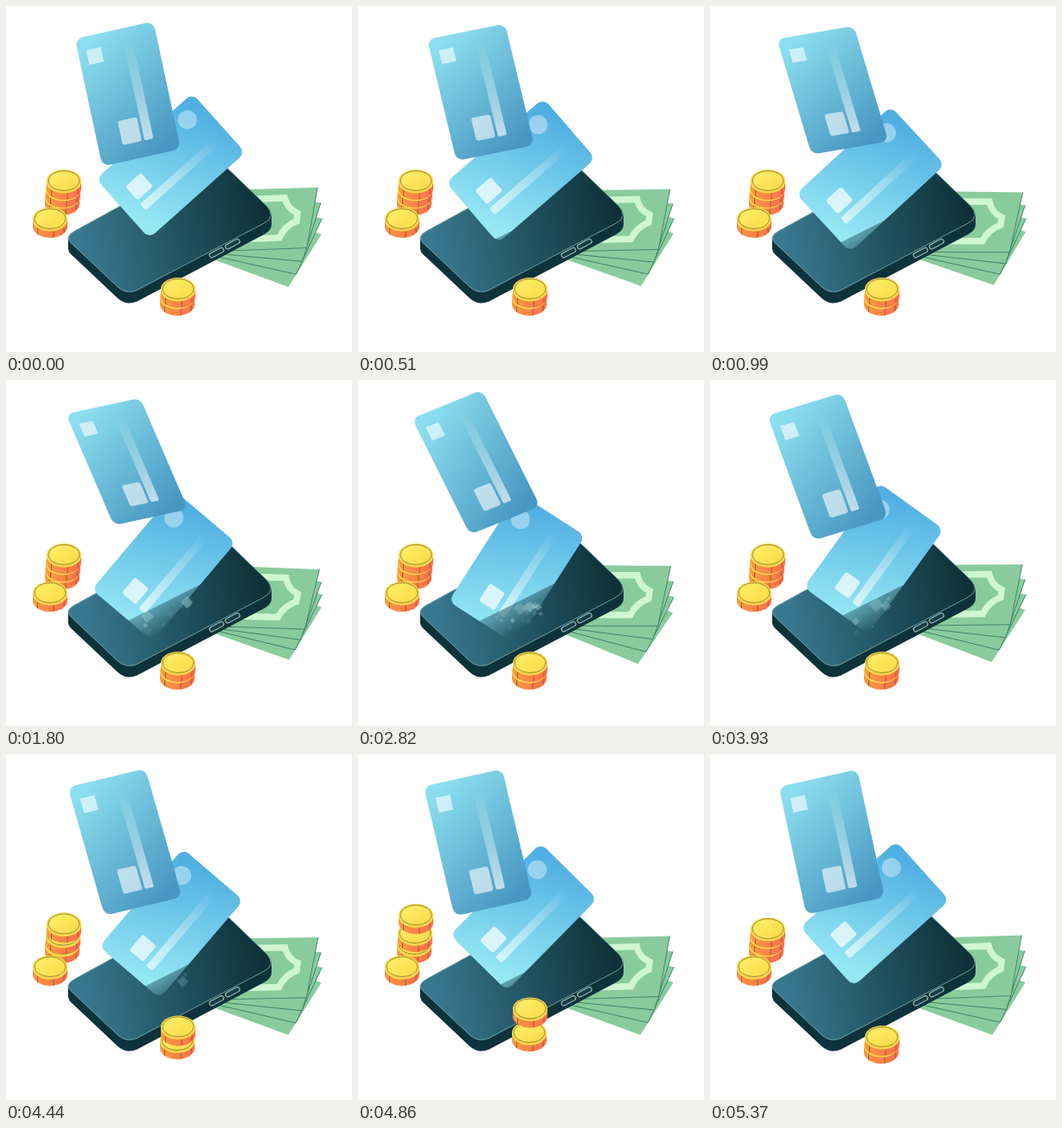
An HTML page for the animation above (5400 ms loop, 400 by 400 pixels).

```html
<!DOCTYPE html>
<html lang="en">
<head>
<meta charset="utf-8">
<title>Mobile payment</title>
<style>
  html, body { margin: 0; width: 100%; height: 100%; overflow: hidden; background: #fff; }
  svg { display: block; width: 100vw; height: 100vh; }
  #bills { color: #417f69; }
  #bills > :first-child { color: #89cb9b; }
</style>
</head>
<body>
<svg viewBox="0 0 400 400">
  <defs>
    <linearGradient id="upperFill" x1=".3" y1="0" x2=".7" y2="1">
      <stop offset="0" stop-color="#8bdeee"/><stop offset="1" stop-color="#4897c2"/>
    </linearGradient>
    <linearGradient id="lowerFill" x1="0" y1=".65" x2="1" y2=".35">
      <stop offset="0" stop-color="#96e8f3"/><stop offset="1" stop-color="#50afe2"/>
    </linearGradient>
    <linearGradient id="stripeDown" x1="0" y1="0" x2="0" y2="1">
      <stop offset="0" stop-color="#fff" stop-opacity="0"/><stop offset="1" stop-color="#fff" stop-opacity=".65"/>
    </linearGradient>
    <linearGradient id="stripeAcross">
      <stop offset="0" stop-color="#fff" stop-opacity=".65"/><stop offset="1" stop-color="#fff" stop-opacity="0"/>
    </linearGradient>
    <linearGradient id="screen" gradientUnits="userSpaceOnUse" x1="85" y1="270" x2="295" y2="225">
      <stop offset="0" stop-color="#397990"/><stop offset=".5" stop-color="#225463"/><stop offset="1" stop-color="#0e3138"/>
    </linearGradient>
    <linearGradient id="coinSide">
      <stop offset="0" stop-color="#fb9a40"/><stop offset="1" stop-color="#ff6c4c"/>
    </linearGradient>
    <linearGradient id="coinTop" x1="0" y1="0" x2="1" y2="1">
      <stop offset="0" stop-color="#fff06a"/><stop offset="1" stop-color="#fbd945"/>
    </linearGradient>
    <linearGradient id="fade" gradientUnits="userSpaceOnUse" x1="160" y1="269" x2="174" y2="297">
      <stop offset="0" stop-color="#fff" stop-opacity=".5"/><stop offset="1" stop-color="#fff" stop-opacity="0"/>
    </linearGradient>
    <mask id="fadeMask" maskUnits="userSpaceOnUse" x="0" y="0" width="400" height="400">
      <path d="M0 349L400 149V400H0Z" fill="url(#fade)"/>
    </mask>
    <clipPath id="above"><path d="M0 0H400V149L0 349Z"/></clipPath>
    <clipPath id="below"><path d="M0 349L400 149V400H0Z"/></clipPath>

    <g id="bill">
      <path d="M230 213.5L360 209L348 279L230 284Z" fill="#89cb9b"/>
      <path d="M360 209L348 279L230 284" fill="none" stroke="currentColor" stroke-width=".9"/>
    </g>
    <g id="coin">
      <path d="M-20 0V9A20 13 0 0 0 20 9V0Z" fill="url(#coinSide)"/>
      <path d="M-14.5 11V18M4 14V21.5M16 9V16" stroke="#8f5a30" stroke-width=".9"/>
      <ellipse cy="1.6" rx="20" ry="13" fill="#ffd94a"/>
      <ellipse rx="20" ry="13" fill="#ffd548"/>
      <ellipse rx="18" ry="11.5" fill="url(#coinTop)" stroke="#8d8436" stroke-width=".9"/>
    </g>
    <g id="lower">
      <rect x="-74.5" y="-46" width="149" height="92" rx="9" fill="url(#lowerFill)"/>
      <rect x="-55" y="-17" width="24" height="21" rx="3" fill="#fff" opacity=".7"/>
      <rect x="-56" y="9.5" width="114" height="9.5" rx="2" fill="url(#stripeAcross)"/>
      <circle cx="50" cy="-27" r="11" fill="#fff" opacity=".38"/>
    </g>
  </defs>

  <g id="bills">
    <use href="#bill"/><use href="#bill"/><use href="#bill"/>
    <g>
      <use href="#bill"/>
      <path d="M262 224L322 221.5Q325 234 337 239L336 248Q322 254 316 267.5L262 270"
            fill="none" stroke="#cff6cf" stroke-width="7.5"/>
    </g>
  </g>

  <g transform="translate(0 .7)">
    <path d="M71.8 266V279Q72 284 77 288L129 337Q139 346 151 341L299 263Q307 258 307 252V240Z" fill="#0c333b"/>
    <path d="M80 259Q66 266 77 275L129 324Q139 333 151 328L299 250Q312 243 302 231L252 183Q240 172 226 179Z"
          fill="url(#screen)" stroke="#7ba5ac" stroke-width=".9"/>
    <g fill="#143f47" stroke="#a3bcbe" stroke-width="1.1">
      <rect x="-9" y="-2.7" width="18" height="5.4" rx="2.7" transform="translate(243.5 284.5) rotate(-28)"/>
      <rect x="-9" y="-2.7" width="18" height="5.4" rx="2.7" transform="translate(262 274.5) rotate(-28)"/>
    </g>
  </g>

  <g id="coins"></g>

  <g mask="url(#fadeMask)"><use href="#lower"/></g>
  <g id="pixels" clip-path="url(#below)" fill="#9ccad0"></g>
  <g clip-path="url(#above)"><use href="#lower"/></g>

  <g id="upper">
    <rect x="-46" y="-74.5" width="92" height="149" rx="9" fill="url(#upperFill)"/>
    <rect x="-18" y="28" width="22.5" height="28" rx="3" fill="#fff" opacity=".6"/>
    <rect x="7.5" y="-58" width="10.5" height="114" rx="2" fill="url(#stripeDown)"/>
    <rect x="-36" y="-59" width="17" height="17" fill="#fff" opacity=".6"/>
  </g>
</svg>
<script>
const LOOP = 5400;
const RAD = Math.PI / 180;
const $ = id => document.getElementById(id);

function add(parent, tag, attrs) {
  const el = document.createElementNS('http://www.w3.org/2000/svg', tag);
  for (const k in attrs) el.setAttribute(k, attrs[k]);
  return parent.appendChild(el);
}

const move = (el, transform) => el.setAttribute('transform', transform);

let seed = 11;
const random = () => (seed = seed * 16807 % 2147483647) / 2147483647;

// Periodic sway: one cycle per loop plus an optional second harmonic, peaks in degrees.
const wave = (phase, mean, amp, peak, amp2 = 0, peak2 = 0) =>
  mean + amp * Math.cos((phase - peak) * RAD) + amp2 * Math.cos(2 * (phase - peak2) * RAD);

// Zero outside start..end, one smooth hump inside.
const hump = (t, start, end) =>
  t > start && t < end ? Math.sin(Math.PI * (t - start) / (end - start)) ** 2 : 0;

// Each stack: x and y of the top coin, count, hop of the lowest and the top coin.
const coins = [[67, 202, 3, 0, 17], [51, 246, 1, 0, 0], [199, 327, 2, 15, 35]]
  .flatMap(([x, y, n, low, high]) => Array.from({ length: n }, (_, k) => {
    const down = n - 1 - k;
    return {
      x: x - down, y: y + 9 * down,
      hop: low + (high - low) * (k / (n - 1 || 1)) ** 2,
      el: add($('coins'), 'use', { href: '#coin' })
    };
  }));

// Squares that break off below the edge where the card enters the screen.
const pixels = Array.from({ length: 34 }, () => {
  const x = 160 + 50 * random(), depth = 3 + 28 * random() ** 1.4;
  const r = (1.2 + 5.5 * random()) * (1 - depth / 45);
  const start = 1000 + 2500 * random();
  return {
    x, y: 349 - x / 2 + depth, start, end: start + 1300,
    el: add($('pixels'), 'rect', { x: -r, y: -r, width: 2 * r, height: 2 * r })
  };
});

function draw(t) {
  const a = t / LOOP * 360;

  // The upper card tilts in space, so its two sides turn and stretch separately.
  const across = wave(a, 14.9, 5.5, 215, 2.5, 15) * RAD;
  const along = wave(a, 19.4, 7.3, 178) * RAD;
  const w = wave(a, 90, 3, 340) / 92;
  const h = wave(a, 148, 8, 275, 2, 175) / 149;
  move($('upper'), `matrix(${w * Math.cos(across)} ${-w * Math.sin(across)}
    ${h * Math.sin(along)} ${h * Math.cos(along)}
    ${wave(a, 138.8, 3.2, 50)} ${wave(a, 98.2, 4.2, 325)})`);

  move($('lower'), `translate(${wave(a, 186.8, 4.7, 320)} ${wave(a, 203.8, 16.9, 173, 2.2, 90)})
    rotate(${wave(a, -49.3, 8.5, 27)})`);

  const front = wave(a, 2.1, 1.6, 140, .7, 105);
  const back = wave(a, 22.8, 1.3, 225, .7, 10);
  [...$('bills').children].forEach((el, i) =>
    move(el, `rotate(${back + (front - back) * i / 3} 224 247)`));

  const lift = hump(t, 4230, 5310);
  for (const c of coins) move(c.el, `translate(${c.x} ${c.y - c.hop * lift})`);

  for (const s of pixels) {
    const drift = (t - s.start) / 1300;
    s.el.setAttribute('opacity', .45 * hump(t, s.start, s.end));
    move(s.el, `translate(${s.x + 2 * drift} ${s.y + 5 * drift}) rotate(-42)`);
  }
}

function tick() {
  draw(performance.now() % LOOP);
  requestAnimationFrame(tick);
}
tick();
</script>
</body>
</html>
```
